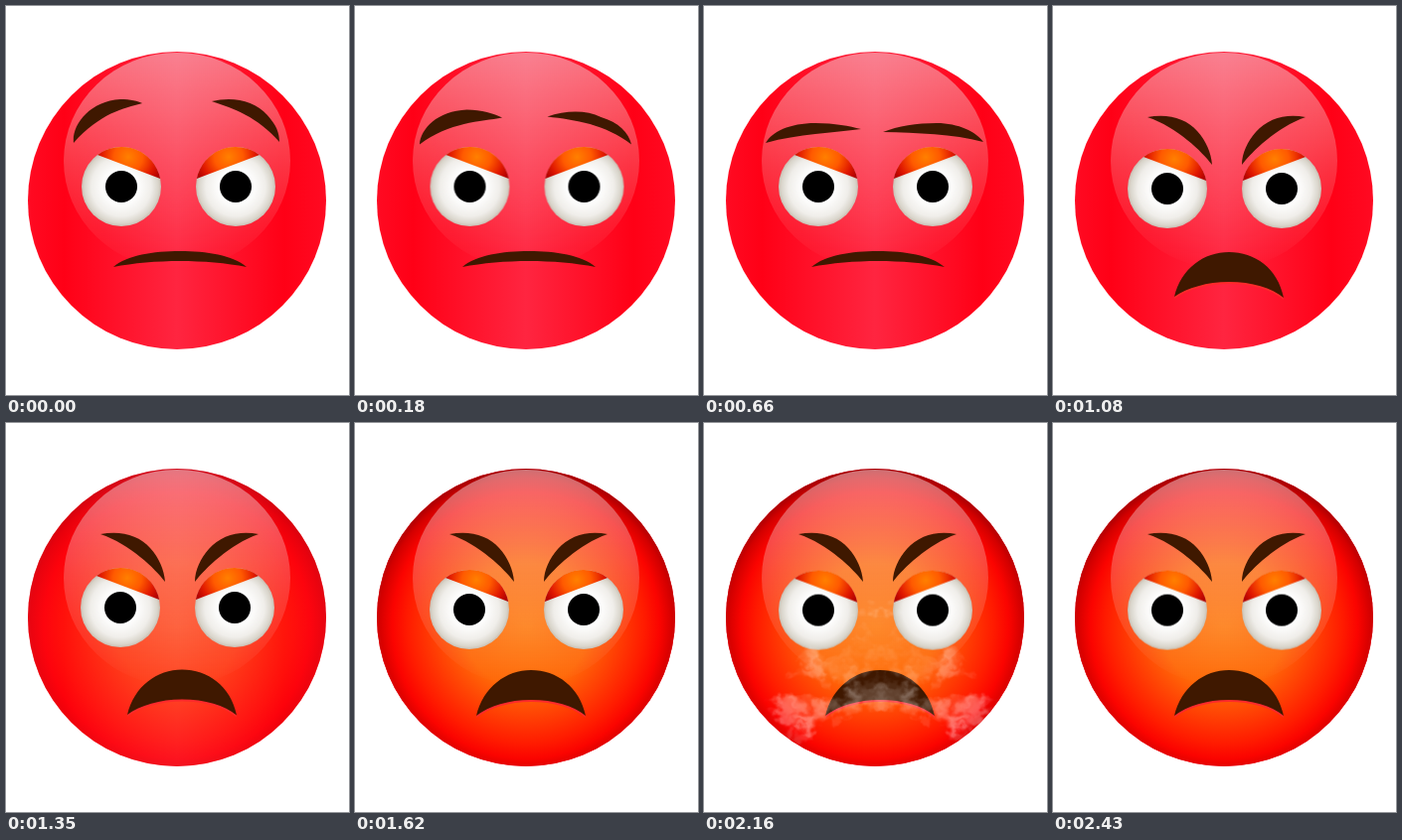
Recreate the animation shown at these times as an HTML page. Size 345 by 392 pixels, loop 2.7 s.

```html
<!DOCTYPE html>
<html lang="en">
<head>
<meta charset="utf-8">
<title>Angry face</title>
<style>
  html, body { margin: 0; width: 100%; height: 100%; overflow: hidden; background: #fff; }
  svg { display: block; width: 345px; height: 392px; }
  .anim { animation: 2700ms linear infinite both; }
  .ink { fill: #3f1800; }

  #eyes { animation-name: look; }
  #browL { animation-name: browL; }
  #browR { animation-name: browR; }
  .mouth { animation-name: mouth; }
  #lip { animation-name: mouth, lip; }
  .heat { animation-name: heat; }
  #smoke { animation-name: smoke; transform-origin: 178px 262px; }

  @keyframes look {
    0% { transform: translate(1px, 0); }
    13.333%, 24.444% { transform: translate(0, 0); }
    40% { transform: translate(0, 2px); }
    60% { transform: translate(0, 6px); }
    71.111%, 100% { transform: translate(0, 6.6px); }
  }
  @keyframes browL {
    0% { d: path("M68 138C66 120 84 96 115 94C125 94 133 96 137 98C118 103 95 108 68 138Z"); }
    13.333% { d: path("M62 141C66 128 82 115 110 115C130 115 146 121 159 127C135 130 95 126 62 141Z"); }
    24.444% { d: path("M62 138C68 127 86 118 112 118C132 118 146 121 158 124C130 128 95 129 62 138Z"); }
    40%, 100% { d: path("M95 112C115 108 134 113 145 126C154 136 159 148 160 160C150 147 125 122 95 112Z"); }
  }
  @keyframes browR {
    0% { d: path("M207 96C228 91 250 95 263 110C272 120 275 128 275 137C252 111 230 104 207 96Z"); }
    13.333% { d: path("M180 127C196 119 215 114 232 114C258 114 276 128 281 142C250 127 215 126 180 127Z"); }
    24.444% { d: path("M180 127C195 121 214 118 234 118C256 118 274 127 281 137C250 129 215 128 180 127Z"); }
    40%, 100% { d: path("M190 160C190 148 196 136 204 127C216 113 235 108 254 112C225 122 200 147 190 160Z"); }
  }
  @keyframes mouth {
    0%, 24.444% { d: path("M108 263C122 251 148 247 175 247C202 247 228 251 242 263C222 259 198 257 175 257C152 257 128 259 108 263Z"); }
    40% { d: path("M122 293C129 264 152 248 177 248C203 248 226 264 232 294C220 284 200 278 177 278C155 278 135 284 122 293Z"); }
    60%, 100% { d: path("M122 295C129 266 152 249 177 249C203 249 226 266 232 295C220 285 200 279 177 279C155 279 135 285 122 295Z"); }
  }
  @keyframes lip {
    0%, 24.444% { opacity: 0; }
    40%, 100% { opacity: 1; }
  }
  @keyframes heat {
    0%, 40% { opacity: 0; }
    60%, 100% { opacity: 1; }
  }
  @keyframes smoke {
    0%, 60% { opacity: 0; transform: scale(.3); }
    71.111% { opacity: 1; transform: scale(1); }
    80% { opacity: .65; transform: translate(0, 9px) scale(1.24, 1.14); }
    90%, 100% { opacity: 0; transform: translate(0, 20px) scale(1.5, 1.3); }
  }
</style>
</head>
<body>
<svg viewBox="0 0 345 392">
  <defs>
    <linearGradient id="red">
      <stop offset="0" stop-color="#ff0a22"/>
      <stop offset=".12" stop-color="#ff0016"/>
      <stop offset=".5" stop-color="#ff2540"/>
      <stop offset=".86" stop-color="#ff0016"/>
      <stop offset="1" stop-color="#ff0a22"/>
    </linearGradient>
    <radialGradient id="fire" gradientUnits="userSpaceOnUse" cx="172" cy="204" r="158">
      <stop offset="0" stop-color="#ff7d12"/>
      <stop offset=".4" stop-color="#ff6908"/>
      <stop offset=".75" stop-color="#ff1c00"/>
      <stop offset=".85" stop-color="#fb0400"/>
      <stop offset=".94" stop-color="#d20000"/>
      <stop offset="1" stop-color="#a00004"/>
    </radialGradient>
    <linearGradient id="shine" x2="0" y2="1">
      <stop offset="0" stop-color="#f4d6dc" stop-opacity=".52"/>
      <stop offset=".5" stop-color="#f4d6d0" stop-opacity=".25"/>
      <stop offset="1" stop-color="#f4d6d0" stop-opacity="0"/>
    </linearGradient>
    <radialGradient id="ball">
      <stop offset=".4" stop-color="#fff"/>
      <stop offset=".75" stop-color="#f0eeea"/>
      <stop offset=".93" stop-color="#d9d5cb"/>
      <stop offset="1" stop-color="#c9c0b4"/>
    </radialGradient>
    <radialGradient id="lidWarm" gradientUnits="userSpaceOnUse" cx="7" cy="-30" r="36">
      <stop offset="0" stop-color="#ff8000"/>
      <stop offset=".4" stop-color="#ff5a00"/>
      <stop offset=".75" stop-color="#e01800"/>
      <stop offset="1" stop-color="#b00000"/>
    </radialGradient>
    <radialGradient id="lidHot" gradientUnits="userSpaceOnUse" cx="20" cy="-14" r="46">
      <stop offset="0" stop-color="#ff5000"/>
      <stop offset=".4" stop-color="#f02400"/>
      <stop offset=".7" stop-color="#c80800"/>
      <stop offset="1" stop-color="#960000"/>
    </radialGradient>
    <filter id="wisp" filterUnits="userSpaceOnUse" x="130" y="150" width="190" height="200" color-interpolation-filters="sRGB">
      <feTurbulence type="fractalNoise" baseFrequency=".07" numOctaves="3" seed="8" result="noise"/>
      <feGaussianBlur in="SourceGraphic" stdDeviation="1.6"/>
      <feDisplacementMap in2="noise" scale="26" xChannelSelector="R" yChannelSelector="G"/>
    </filter>
    <g id="eye">
      <circle r="40" fill="url(#ball)"/>
      <path id="lid" d="M-24 -32A40 40 0 0 1 39.2 -8Z" fill="url(#lidWarm)"/>
      <path class="anim heat" d="M-24 -32A40 40 0 0 1 39.2 -8Z" fill="url(#lidHot)"/>
      <circle r="16"/>
    </g>
  </defs>

  <circle cx="172" cy="196" r="150" fill="url(#red)"/>
  <circle class="anim heat" cx="172" cy="196" r="150" fill="url(#fire)"/>
  <ellipse cx="172" cy="156" rx="114" ry="109" fill="url(#shine)"/>

  <g id="eyes" class="anim">
    <use href="#eye" transform="translate(115 182)"/>
    <use href="#eye" transform="translate(230 182) scale(-1 1)"/>
  </g>
  <path id="browL" class="anim ink"/>
  <path id="browR" class="anim ink"/>
  <path id="lip" class="anim" fill="#ff2a2c" transform="translate(0 2)"/>
  <path class="anim ink mouth"/>

  <g id="smoke" class="anim">
    <g id="half" fill="#fff" filter="url(#wisp)"></g>
    <use href="#half" transform="translate(356 0) scale(-1 1)"/>
  </g>
</svg>
<script>
  // Puff clusters: x, y, half width, half height, opacity, count
  const clusters = [
    [190, 266, 20, 10, .16, 22],
    [220, 278, 18, 9, .16, 16],
    [245, 281, 20, 13, .2, 26],
    [258, 271, 11, 6, .22, 8],
    [246, 298, 9, 9, .2, 8],
    [222, 244, 28, 8, .15, 22],
    [235, 236, 16, 5, .18, 7],
    [193, 236, 17, 10, .1, 9],
    [184, 188, 9, 7, .1, 6],
    [196, 212, 10, 8, .08, 5]
  ];
  const half = document.getElementById("half");
  let seed = 11;
  const rand = () => (seed = seed * 16807 % 2147483647) / 2147483647;

  for (const [x, y, w, h, alpha, count] of clusters) {
    for (let i = 0; i < count; i++) {
      const angle = rand() * Math.PI * 2, dist = Math.sqrt(rand());
      const puff = document.createElementNS("http://www.w3.org/2000/svg", "circle");
      puff.setAttribute("cx", x + Math.cos(angle) * dist * w);
      puff.setAttribute("cy", y + Math.sin(angle) * dist * h);
      puff.setAttribute("r", 2.5 + rand() * 4);
      puff.setAttribute("opacity", alpha * (.6 + rand() * .8));
      half.append(puff);
    }
  }
</script>
</body>
</html>
```
